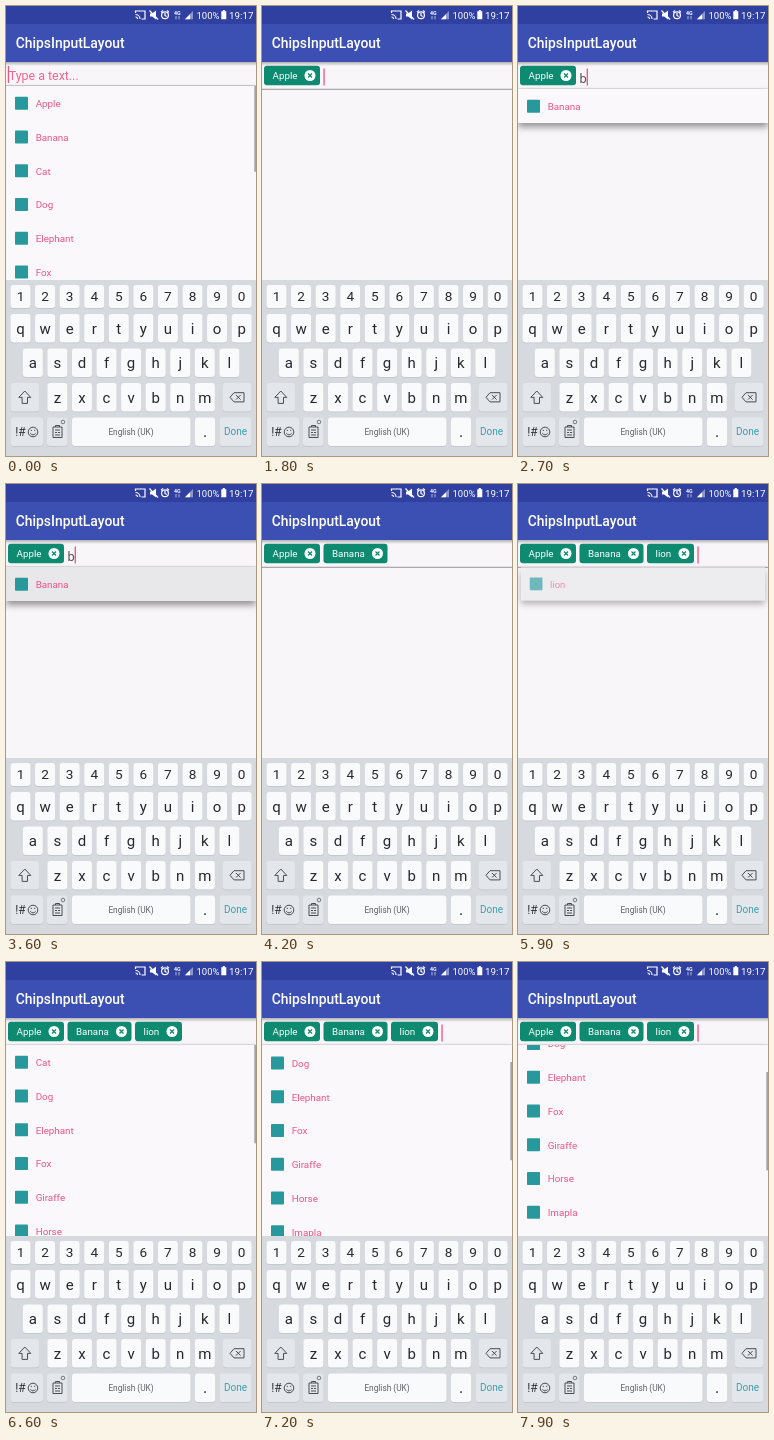
An HTML page that plays this animation: 250x450 px, repeating every 8 s.

```html
<!DOCTYPE html>
<html lang="en">
<head>
<meta charset="utf-8">
<title>Chips input</title>
<style>
  html, body { margin: 0; width: 100%; height: 100%; overflow: hidden; background: #f9f6fa; }
  svg { display: block; }
  #stage { width: 250px; height: 450px; }
  text { font-family: Roboto, sans-serif; white-space: pre; }
</style>
</head>
<body>
<svg id="stage" viewBox="0 0 250 450">
  <defs>
    <linearGradient id="barShade" x2="0" y2="1">
      <stop offset="0" stop-opacity=".28"/><stop offset="1" stop-opacity="0"/>
    </linearGradient>
    <filter id="drop" x="-10%" y="-20%" width="120%" height="170%">
      <feDropShadow dx="0" dy="4" stdDeviation="3.5" flood-opacity=".42"/>
    </filter>
  </defs>
  <rect width="250" height="450" fill="#f9f6fa"/>
  <g id="field"></g>
  <g id="panel"></g>
  <g id="header">
    <rect y="56" width="250" height="4" fill="url(#barShade)"/>
    <rect width="250" height="56" fill="#3c50b4"/>
    <rect width="250" height="18" fill="#3040a0"/>
    <g fill="none" stroke="#fff" stroke-width="1.2">
      <path d="M129.5 7V5H139v8h-3.5M129.5 8.5a4.5 4.5 0 0 1 4.5 4.5M129.5 11a2 2 0 0 1 2 2"/>
      <path d="M143.5 4.5l8.5 9"/>
      <circle cx="159" cy="9.2" r="3.4"/>
      <path d="M159 7v2.4l1.6 1M155 6.2l2-1.8M163 6.2l-2-1.8"/>
      <path d="M170 10v3.4M173 10v3.4" stroke-width=".9" opacity=".7"/>
    </g>
    <path d="M144 7.5h2.2L150 4.5v9l-3.8-3H144z" fill="#fff"/>
    <path d="M179 13.3L187 5v8.3z" fill="#fff" opacity=".45"/>
    <path d="M179 13.3L184 8.2v5.1z" fill="#fff"/>
    <path d="M215.3 5.3h1.5V4h2v1.3h1.5v8h-5z" fill="#fff"/>
  </g>
  <g id="keys"></g>
  <g id="preview"></g>
</svg>
<script>
const $ = id => document.getElementById(id);

function add(parent, tag, attrs, text) {
  const el = document.createElementNS('http://www.w3.org/2000/svg', tag);
  for (const k in attrs) el.setAttribute(k, attrs[k]);
  if (text) el.textContent = text;
  parent.append(el);
  return el;
}
const set = (el, attrs) => { for (const k in attrs) el.setAttribute(k, attrs[k]); };
const show = (el, on) => { el.style.display = on ? '' : 'none'; };
const label = (parent, s, x, y, size, fill, extra) =>
  add(parent, 'text', { x, y, 'font-size': size, fill, ...extra }, s);
const mid = { 'text-anchor': 'middle' };

// Header
label($('header'), 'ChipsInputLayout', 9.7, 42.3, 13.9, '#fff', { 'font-weight': 500 });
label($('header'), '4G', 168, 8.8, 5.3, '#fff', { 'font-weight': 700 });
label($('header'), '100%', 190.5, 12.8, 9.5, '#fff');
label($('header'), '19:17', 223, 12.8, 9.8, '#fff');

// Keyboard
const keys = $('keys'), keyPos = {};
add(keys, 'rect', { y: 274, width: 250, height: 176, fill: '#d6d9dd' });

function key(x, y, w, h, fill = '#f9fafc') {
  add(keys, 'rect', { x, y: y + .8, width: w, height: h, rx: 3, fill: '#bfc3c8' });
  add(keys, 'rect', { x, y, width: w, height: h, rx: 3, fill });
}
function keyRow(chars, first, y, h, size) {
  [...chars].forEach((c, i) => {
    const x = first + i * 24.57;
    key(x - 10, y, 20, h);
    label(keys, c, x, y + h / 2 + size * .35, size, '#25282c', mid);
    keyPos[c] = [x, y];
  });
}
keyRow('1234567890', 14.5, 279, 23, 13.6);
keyRow('qwertyuiop', 14.5, 308, 28.5, 15);
keyRow('asdfghjkl', 26.8, 342.5, 28.5, 15);
keyRow('zxcvbnm', 51.4, 377, 28.5, 15);
const side = '#e3e6ea';
key(4.5, 377, 28.5, 28.5, side);
key(217, 377, 28.5, 28.5, side);
key(4.5, 411.5, 32.5, 28.5, side);
key(41, 411.5, 20.5, 28.5, side);
key(66, 411.5, 118.5, 28.5);
key(189, 411.5, 20, 28.5);
key(213.5, 411.5, 32, 28.5, side);
label(keys, '!#', 9.2, 430, 12, '#33373b');
label(keys, 'English (UK)', 125, 428.8, 8.3, '#5d6165', mid);
label(keys, '.', 199, 431, 16, '#25282c', mid);
label(keys, 'Done', 229.5, 429.3, 10, '#3a9fae', mid);
const ink = { fill: 'none', stroke: '#4a4e52', 'stroke-width': 1 };
add(keys, 'path', { ...ink, d: 'M18.8 385l6 6.4h-3.3v6h-5.4v-6h-3.3z' });
add(keys, 'path', { ...ink, d: 'M224 391.3l4-4.6h10v9.2h-10zM230 389l4.6 4.6M234.600 389l-4.6 4.6' });
add(keys, 'circle', { ...ink, cx: 27, cy: 426, r: 4.8 });
add(keys, 'path', { ...ink, d: 'M24.300 427.200q2.700 3.400 5.400 0M25.300 423.800v1.200M28.700 423.800v1.200' });
add(keys, 'path', { ...ink, d: 'M47 421h9v10.500h-9zM49.500 421v-1.500h4v1.500M49 424h5M49 426.500h2M52 426.500h2M49 429h5' });
add(keys, 'circle', { ...ink, cx: 57, cy: 416, r: 1.8, 'stroke-width': .7 });

// Key preview bubble
const preview = $('preview');
add(preview, 'rect', { x: -14, y: -36, width: 28, height: 31, rx: 4, fill: '#fcfcfe', stroke: '#c4c8cd', 'stroke-width': .7 });
const previewText = label(preview, '', 0, -14, 19, '#25282c', mid);

// Input field
const field = $('field'), pink = '#ee5483';
const line = add(field, 'rect', { width: 250, height: .9, fill: '#8c898d' });
const hint = label(field, 'Type a text...', 2.8, 73.6, 12.4, '#f0658c');
const typed = label(field, '', 0, 76.6, 12.9, '#55535a');
const cursor = add(field, 'rect', { width: 1.3, height: 17, fill: pink });

// name, left edge, width, time added
const chips = [['Apple', 2, 56, 700], ['Banana', 61.5, 64, 3800], ['lion', 129, 47, 5800]]
  .map(([name, x, w, at]) => {
    const g = add(field, 'g', { transform: `translate(${x} 59.8)` });
    add(g, 'rect', { width: w, height: 19.5, rx: 3, fill: '#0d8a70' });
    label(g, name, 8.5, 13.4, 9.8, '#fff');
    add(g, 'circle', { cx: w - 10, cy: 9.7, r: 5.5, fill: '#fff' });
    add(g, 'path', { d: `M${w - 12} 7.7l4 4m0-4l-4 4`, stroke: '#0d8a70', 'stroke-width': 1.3 });
    return { g, end: x + w, at };
  });

// Suggestion popups
const animals = ['Apple', 'Banana', 'Cat', 'Dog', 'Elephant', 'Fox', 'Giraffe', 'Horse', 'Imapla'];
const PITCH = 33.75;

function popup(names, top, total, from, to) {
  const g = add($('panel'), 'g', {});
  const single = total === 1, h = single ? 34 : 274 - top;
  add(g, 'rect', { y: top, width: 250, height: h, fill: '#faf8fb', filter: 'url(#drop)' });
  const ripple = add(g, 'rect', { y: top, width: 250, height: 34, fill: '#000', opacity: .07 });
  const view = add(g, 'svg', { y: top, width: 250, height: h, overflow: 'hidden' });
  const rows = add(view, 'g', {});
  const texts = names.map((name, i) => {
    const y = 17.5 + i * PITCH;
    add(rows, 'rect', { x: 9, y: y - 6.8, width: 13, height: 13, rx: .8, fill: '#27999c' });
    return label(rows, name, 29.7, y + 3.6, 9.8, pink);
  });
  const bar = single ? null
    : add(view, 'rect', { x: 248.3, width: 1.7, height: h * h / (total * PITCH), fill: '#a5a3a8' });
  return { g, top, h, total, from, to, ripple, rows, texts, bar };
}
const popups = [
  popup(animals, 80, 13, -300, 500),
  popup(['Banana'], 83, 1, 2500, 3600),
  popup(['lion'], 83, 1, 4800, 5700),
  popup(animals.slice(2), 83, 11, 6400, 9000),
];

// Each list is [time, value]; the latest entry holds
const strokes = [[2400, 'b'], [4700, 'l'], [4900, 'i'], [5000, 'o'], [5200, 'n']];
const texts = [[0, ''], [2500, 'b'], [3800, ''], [4800, 'l'], [4900, 'li'], [5100, 'lio'], [5200, 'lion'], [5800, '']];
const blinks = [0, 100, 500, 1200, 1800, 2200, 2400, 2900, 3400, 4200, 4700, 5700, 5800, 6400, 6900, 7400, 7900];
const latest = (list, t) => list.filter(e => e[0] <= t).pop();

const ease = p => { p = Math.max(0, Math.min(1, p)); return p * p * (3 - 2 * p); };
const scrollAt = t => 33 * ease((t - 6600) / 600) + 19.5 * ease((t - 7300) / 600);

function drawPopup(p, t, text) {
  const out = t - p.to;
  const alpha = out < 0 ? Math.min(1, (t - p.from + 100) / 300) : [1, .9, .66, .3][out / 100] || 0;
  show(p.g, t >= p.from && alpha > 0);
  const s = out > 0 ? 1 - .012 * out / 100 : 1;
  set(p.g, {
    opacity: alpha,
    transform: `translate(125 ${p.top}) scale(${s}) translate(-125 ${-p.top})`,
  });
  show(p.ripple, out >= 0);
  if (p.bar) {
    const y = p.from === 6400 ? scrollAt(t) : 0;
    set(p.rows, { transform: `translate(0 ${-y})` });
    set(p.bar, { y: y * p.h / (p.total * PITCH) });
  } else if (p.from === 4800) {
    p.texts[0].textContent = text || 'lion';
  }
}

function draw(t) {
  const added = chips.filter(c => c.at <= t);
  chips.forEach(c => show(c.g, c.at <= t));
  const any = added.length > 0;
  const left = any ? added[added.length - 1].end + 3.4 : 1.8;
  const text = latest(texts, t)[1];
  show(hint, !any);
  set(line, { y: any ? 82.8 : 79.6 });
  typed.textContent = text;
  set(typed, { x: left });
  set(cursor, { x: left + (text ? typed.getComputedTextLength() : 0), y: any ? 62.5 : 60 });
  show(cursor, blinks.filter(b => b <= t).length % 2);

  popups.forEach(p => drawPopup(p, t, text));

  const hit = latest(strokes, t);
  const pressed = hit && t - hit[0] < 100;
  show(preview, pressed);
  if (pressed) {
    set(preview, { transform: `translate(${keyPos[hit[1]]})` });
    previewText.textContent = hit[1];
  }
}

const LOOP = 8000, STEP = 100;
const start = performance.now();
function tick(now) {
  const t = Math.max(0, now - start) % LOOP;
  draw(Math.floor(t / STEP) * STEP);
  requestAnimationFrame(tick);
}
draw(0);
requestAnimationFrame(tick);
</script>
</body>
</html>
```
